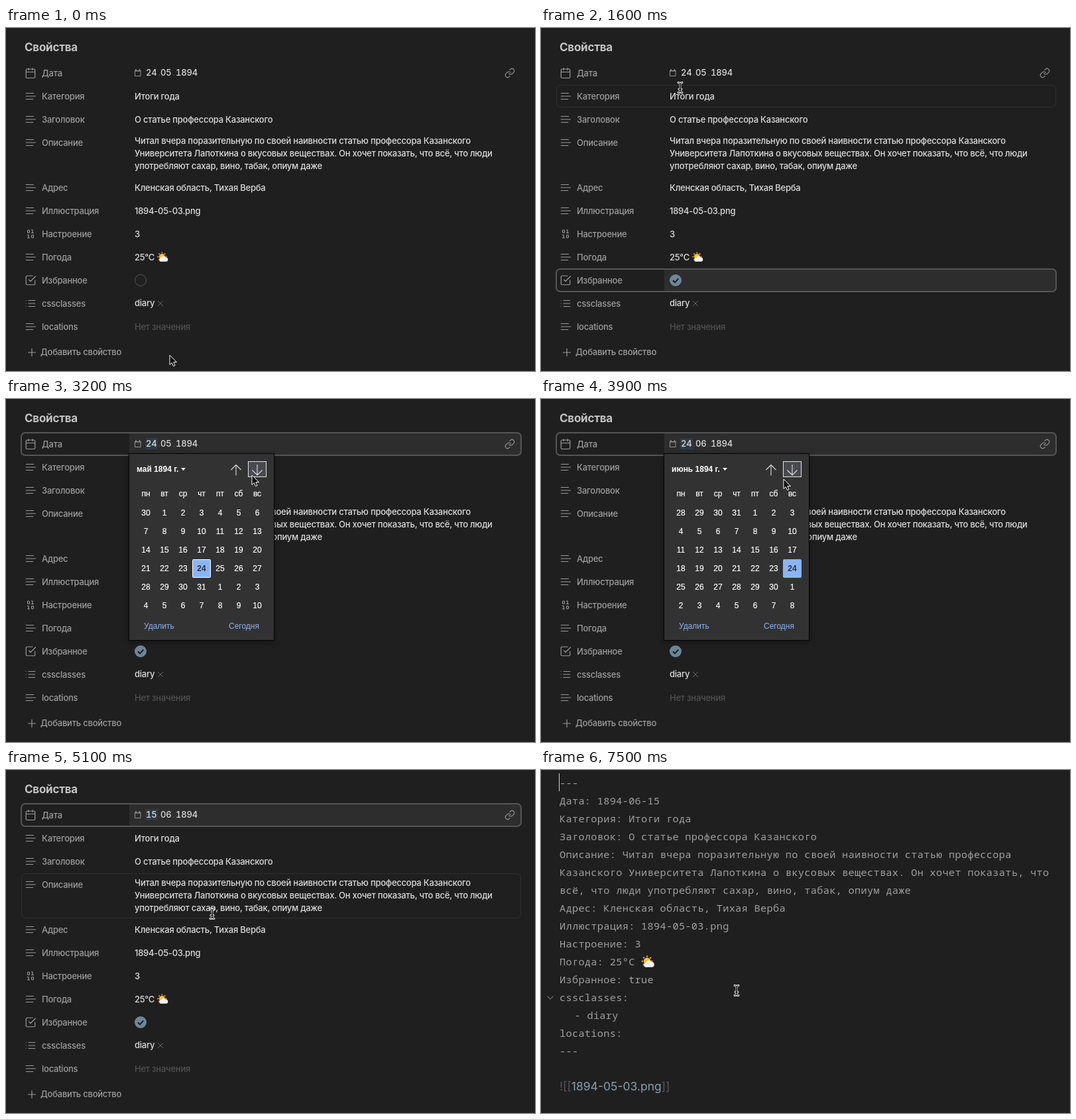
An HTML page that plays this animation: 798 by 518 pixels, repeating every 7.8 s.

```html
<!DOCTYPE html>
<html lang="ru">
<head>
<meta charset="utf-8">
<title>Свойства</title>
<style>
  html, body { margin: 0; width: 100%; height: 100%; overflow: hidden; background: #1f1f1f; }
  svg { display: block; }
  text { white-space: pre; }
  .ui { font: 500 13px Inter, "Open Sans", sans-serif; letter-spacing: -.24px; }
  .label { fill: #9c9c9c; }
  .value { fill: #dcdcdc; }
  .faint { fill: #515151; }
  .title { font: 700 17px Inter, sans-serif; fill: #c4c4c4; }
  .date { font-variant-numeric: tabular-nums; letter-spacing: -.2px; }
  .icon { fill: none; stroke: #9a9a9a; stroke-width: 1.6; stroke-linecap: round; stroke-linejoin: round; }
  .cal { font: 12px "Liberation Sans", Arial, sans-serif; fill: #fff; }
  .cal .plain { stroke: #fff; stroke-width: .2; }
  .mid { text-anchor: middle; }
  .bold { font-weight: 700; }
  .link { fill: #8ab4f8; }
  .code { font: 15.3px "Noto Sans Mono", "DejaVu Sans Mono", monospace; letter-spacing: .29px; fill: #a0a0a0; }
  .embed { font: 17.5px Inter, sans-serif; letter-spacing: 0; fill: #555; }
  .embed tspan { fill: #86a0b0; }
</style>
</head>
<body>
<svg id="stage" width="798" height="518" viewBox="0 0 798 518"></svg>
<script>
const LOOP = 7800, STEP = 100;

const ICONS = {
  calendar: 'M5 4h14a2 2 0 0 1 2 2v14a2 2 0 0 1-2 2H5a2 2 0 0 1-2-2V6a2 2 0 0 1 2-2zM16 2v4M8 2v4M3 10h18',
  text: 'M3 6h15M3 12h19M3 18h14',
  binary: 'M16 14a2 2 0 0 1 2 2v2a2 2 0 0 1-4 0v-2a2 2 0 0 1 2-2zM8 4a2 2 0 0 1 2 2v2a2 2 0 0 1-4 0V6a2 2 0 0 1 2-2zM6 20h4M14 10h4M6 14h2v6M14 4h2v6',
  check: 'm9 11 3 3L22 4M21 12v7a2 2 0 0 1-2 2H5a2 2 0 0 1-2-2V5a2 2 0 0 1 2-2h11',
  list: 'M8 6h13M8 12h13M8 18h13M3 6h.01M3 12h.01M3 18h.01',
  link: 'M10 13a5 5 0 0 0 7.54.54l3-3a5 5 0 0 0-7.07-7.07l-1.72 1.71M14 11a5 5 0 0 0-7.54-.54l-3 3a5 5 0 0 0 7.07 7.07l1.71-1.71'
};

// y is the centre of the row's first line
const ROWS = [
  { y: 68, icon: 'calendar', label: 'Дата' },
  { y: 103, icon: 'text', label: 'Категория', value: 'Итоги года' },
  { y: 138, icon: 'text', label: 'Заголовок', value: 'О статье профессора Казанского' },
  { y: 173, h: 66, icon: 'text', label: 'Описание' },
  { y: 241, icon: 'text', label: 'Адрес', value: 'Кленская область, Тихая Верба' },
  { y: 276, icon: 'text', label: 'Иллюстрация', value: '1894-05-03.png' },
  { y: 311, icon: 'binary', label: 'Настроение', value: '3' },
  { y: 346, icon: 'text', label: 'Погода', value: '25°C' },
  { y: 381, icon: 'check', label: 'Избранное' },
  { y: 416, icon: 'list', label: 'cssclasses' },
  { y: 451, icon: 'text', label: 'locations' }
];
const DATE_ROW = 0, CHECK_ROW = 8;

const DESCRIPTION = [
  'Читал вчера поразительную по своей наивности статью профессора Казанского',
  'Университета Лапоткина о вкусовых веществах. Он хочет показать, что всё, что люди',
  'употребляют сахар, вино, табак, опиум даже'
];

const CODE = [
  '---',
  'Дата: 1894-06-15',
  'Категория: Итоги года',
  'Заголовок: О статье профессора Казанского',
  'Описание: Читал вчера поразительную по своей наивности статью профессора',
  'Казанского Университета Лапоткина о вкусовых веществах. Он хочет показать, что',
  'всё, что люди употребляют сахар, вино, табак, опиум даже',
  'Адрес: Кленская область, Тихая Верба',
  'Иллюстрация: 1894-05-03.png',
  'Настроение: 3',
  'Погода: 25°C',
  'Избранное: true',
  'cssclasses:',
  '- diary',
  'locations:',
  '---'
];

// Pointer hot spot: time, x, y
const PATH = [
  [0, 247, 494], [600, 203, 382], [900, 203, 382], [1600, 210, 90], [1800, 199, 68],
  [2500, 199, 68], [3200, 371, 115], [3500, 371, 115], [3900, 366, 121],
  [4100, 350, 186], [4300, 311, 217], [5300, 311, 217], [6000, 295, 333], [LOOP, 295, 333]
];

const AT = { check: 800, date: 2000, open: 2100, press: 3200, june: 3300, pick: 4800, close: 5000, code: 6500 };
const MAY_24 = 24, JUNE_24 = 55, JUNE_15 = 46;   // days after 30 April

const text = (x, y, s, cls = '', id = '') =>
  `<text x="${x}" y="${y}" class="${cls}"${id && ` id="${id}"`}>${s}</text>`;

const icon = (name, x, y, size = 18) =>
  `<path class="icon" transform="translate(${x - size / 2} ${y - size / 2}) scale(${size / 24})" d="${ICONS[name]}"/>`;

const weather = (x, y, k) => {
  const rays = [...Array(8).keys()].map(i =>
    `<path d="M-1.4-5.4L0-8 1.4-5.4z" transform="rotate(${i * 45})"/>`).join('');
  return `<g transform="translate(${x} ${y}) scale(${k})">
    <g transform="translate(-1.2 -.6)" fill="#f6a623">${rays}<circle r="4.6" fill="#fdc22f"/></g>
    <path fill="#f1f3f5" d="M-2.5 7.2a2.9 2.9 0 0 1-.2-5.8 4 4 0 0 1 7.3-1.1 3.5 3.5 0 0 1 .9 6.9z"/></g>`;
};

const row = r => icon(r.icon, 37, r.y) + text(54, r.y + 4.5, r.label, 'label') +
  (r.value ? text(194, r.y + 4.5, r.value, 'value') : '');

const dayX = i => 211 + i % 7 * 28;
const dayY = i => 172 + Math.floor(i / 7) * 28;
const dayNumber = i => new Date(Date.UTC(1894, 3, 30 + i)).getUTCDate();

const days = [...Array(70).keys()].map(i =>
  text(dayX(i), dayY(i) + 4.2, dayNumber(i), 'mid plain')).join('');
const weekdays = ['пн', 'вт', 'ср', 'чт', 'пт', 'сб', 'вс'].map((d, i) =>
  text(dayX(i), 147, d, 'mid plain')).join('');

const properties = `
  <g id="props" class="ui">
    <g id="focus">
      <rect x="186" y="-16" width="590" height="32" fill="#2d2d2d"/>
      <rect x="23" y="-17" width="754" height="34" rx="6" fill="none" stroke="#555" stroke-width="2"/>
    </g>
    <rect id="hover" x="23.5" width="753" rx="6" fill="none" stroke="#2f2f2f"/>
    ${text(28, 35, 'Свойства', 'title')}
    ${ROWS.map(row).join('')}
    <path d="M194.5 64.5h8.5v8h-8.5z" fill="none" stroke="#929292"/>
    <path d="M194 64.7h9.5M196 62v2M201.5 62v2" stroke="#929292" stroke-width="1.6"/>
    <rect id="dayBack" x="210" y="59" width="19" height="17" fill="#2d3b45"/>
    <g class="date">
      ${text(211, 72.2, '24', 'value', 'day')}${text(229.5, 72.2, '.', 'faint')}
      ${text(233, 72.2, '05', 'value', 'month')}${text(251.5, 72.2, '.', 'faint')}
      ${text(256, 72.2, '1894', 'value')}
    </g>
    ${icon('link', 760, 68, 16)}
    ${DESCRIPTION.map((s, i) => text(194, 175 + i * 19, s, 'value')).join('')}
    ${weather(236.5, 346, .95)}
    <circle id="unchecked" cx="203" cy="381" r="8.5" fill="none" stroke="#555"/>
    <g id="checked">
      <circle cx="203" cy="381" r="9" fill="#6b8798"/>
      <path d="M199 381.3l3 3 5.3-5.8" fill="none" stroke="#1e1e1e" stroke-width="2"/>
    </g>
    ${text(194, 420, 'diary', 'value')}
    <path d="M229 412l8 8m0-8l-8 8" stroke="#666"/>
    ${text(194, 455.5, 'Нет значения', 'faint')}
    <path d="M33 490h12M39 484v12" stroke="#9a9a9a" stroke-width="1.2"/>
    ${text(52, 494, 'Добавить свойство', 'label')}
  </g>`;

const calendar = `
  <g id="calendar" class="cal">
    <rect x="185.5" y="82.5" width="219" height="282" fill="#323232" stroke="#050505"
      style="filter:drop-shadow(0 2px 5px #0006)"/>
    ${text(197, 110, '', 'bold', 'heading')}
    <path id="marker" d="M0 104h7l-3.5 4z"/>
    <rect id="button" x="365.5" y="94.5" width="27" height="23" fill="#484a50" stroke="#e4e4e4"/>
    <path d="M347 115.5V99.5M339.5 107l7.5-7.5 7.5 7.5M379 99v16M371.5 107.5l7.5 7.5 7.5-7.5"
      fill="none" stroke="#dedede" stroke-width="1.1"/>
    ${weekdays}
    <clipPath id="window"><rect x="190" y="157" width="210" height="169"/></clipPath>
    <g clip-path="url(#window)"><g id="weeks">
      ${days}
      <g id="picked">
        <rect x="-13.5" y="-16.5" width="27" height="27" rx="1" fill="#8ab4f8" transform="translate(0 3)"/>
        ${text(0, 4.2, '', 'mid bold', 'pickedDay')}
      </g>
    </g></g>
    ${text(208, 347, 'Удалить', 'link')}
    ${text(336, 347, 'Сегодня', 'link')}
  </g>`;

const source = `
  <g id="code" class="code">
    ${CODE.map((s, i) => text(s === '- diary' ? 50.5 : 28, 25 + i * 27, s)).join('')}
    ${weather(161.5, 289.5, 1.15)}
    <path d="M9.5 341.5l4.5 4.5 4.5-4.5" fill="none" stroke="#6a6a6a" stroke-width="1.2"/>
    ${text(28, 484, '![[<tspan>1894-05-03.png</tspan>]]', 'embed')}
    <path id="caret" d="M27.5 5v27" stroke="#d4d4d4"/>
  </g>`;

const BEAM = 'M-3-7.5Q0-7.5 0-5V5Q0 7.5-3 7.5M3-7.5Q0-7.5 0-5V5Q0 7.5 3 7.5M-2 2.5H2';
const pointer = `
  <g id="pointer">
    <path id="arrow" d="M0 0v14.5l3.3-3 2.2 5.2 2.5-1-2.2-5.1h4.6z" fill="#000" stroke="#fff"/>
    <g id="beam" fill="none" stroke-linecap="round">
      <path d="${BEAM}" stroke="#fff" stroke-width="2.8"/><path d="${BEAM}" stroke="#000"/>
    </g>
  </g>`;

document.getElementById('stage').innerHTML = properties + calendar + source + pointer;

const $ = id => document.getElementById(id);
const show = (id, on) => $(id).setAttribute('display', on ? 'inline' : 'none');
const move = (id, x, y) => $(id).setAttribute('transform', `translate(${x} ${y})`);
const ease = u => u * u * (3 - 2 * u);

function pointerAt(t) {
  const n = PATH.findIndex(p => p[0] > t);
  const [t0, x0, y0] = PATH[n - 1], [t1, x1, y1] = PATH[n];
  const u = ease((t - t0) / (t1 - t0));
  return [x0 + (x1 - x0) * u, y0 + (y1 - y0) * u];
}

function drawCalendar(t) {
  const june = t >= AT.june;
  const pick = t >= AT.pick ? JUNE_15 : june ? JUNE_24 : MAY_24;
  const scroll = june ? ease(Math.min(1, (t - AT.june + STEP) / 400)) : 0;
  $('heading').textContent = june ? 'июнь 1894 г.' : 'май 1894 г.';
  move('marker', june ? 274 : 264, 0);
  show('button', t >= AT.press && t < AT.pick);
  move('weeks', 0, -112 * scroll);
  move('picked', dayX(pick), dayY(pick));
  $('picked').firstElementChild.setAttribute('stroke', pick === JUNE_24 ? '#8ab4f8' : '#fff');
  $('pickedDay').setAttribute('fill', '#323232');
  $('pickedDay').textContent = dayNumber(pick);
}

function draw(t) {
  const [x, y] = pointerAt(t);
  const open = t >= AT.open && t < AT.close;
  const code = t >= AT.code;
  const focused = t >= AT.date ? DATE_ROW : t >= AT.check ? CHECK_ROW : -1;
  const over = open ? -1 : ROWS.findIndex(r => y >= r.y - 17 && y <= r.y - 15 + (r.h || 32));

  show('props', !code);
  show('code', code);
  show('calendar', open);
  show('caret', t < 7000 || t >= 7500);

  show('focus', focused >= 0);
  if (focused >= 0) move('focus', 0, ROWS[focused].y);
  show('hover', over >= 0 && over !== focused);
  if (over >= 0) {
    $('hover').setAttribute('y', ROWS[over].y - 16.5);
    $('hover').setAttribute('height', (ROWS[over].h || 32) + 1);
  }

  show('checked', t >= AT.check);
  show('unchecked', t < AT.check);
  show('dayBack', t >= AT.date);
  $('day').textContent = t >= AT.close ? '15' : '24';
  $('month').textContent = t >= AT.june ? '06' : '05';
  if (open) drawCalendar(t);

  const beam = code || (over >= 0 && over !== CHECK_ROW && x > 204);
  show('beam', beam);
  show('arrow', !beam);
  move('pointer', x, y);
}

function frame(now) {
  draw(Math.floor(now % LOOP / STEP) * STEP);
  requestAnimationFrame(frame);
}
draw(0);
requestAnimationFrame(frame);
</script>
</body>
</html>
```
